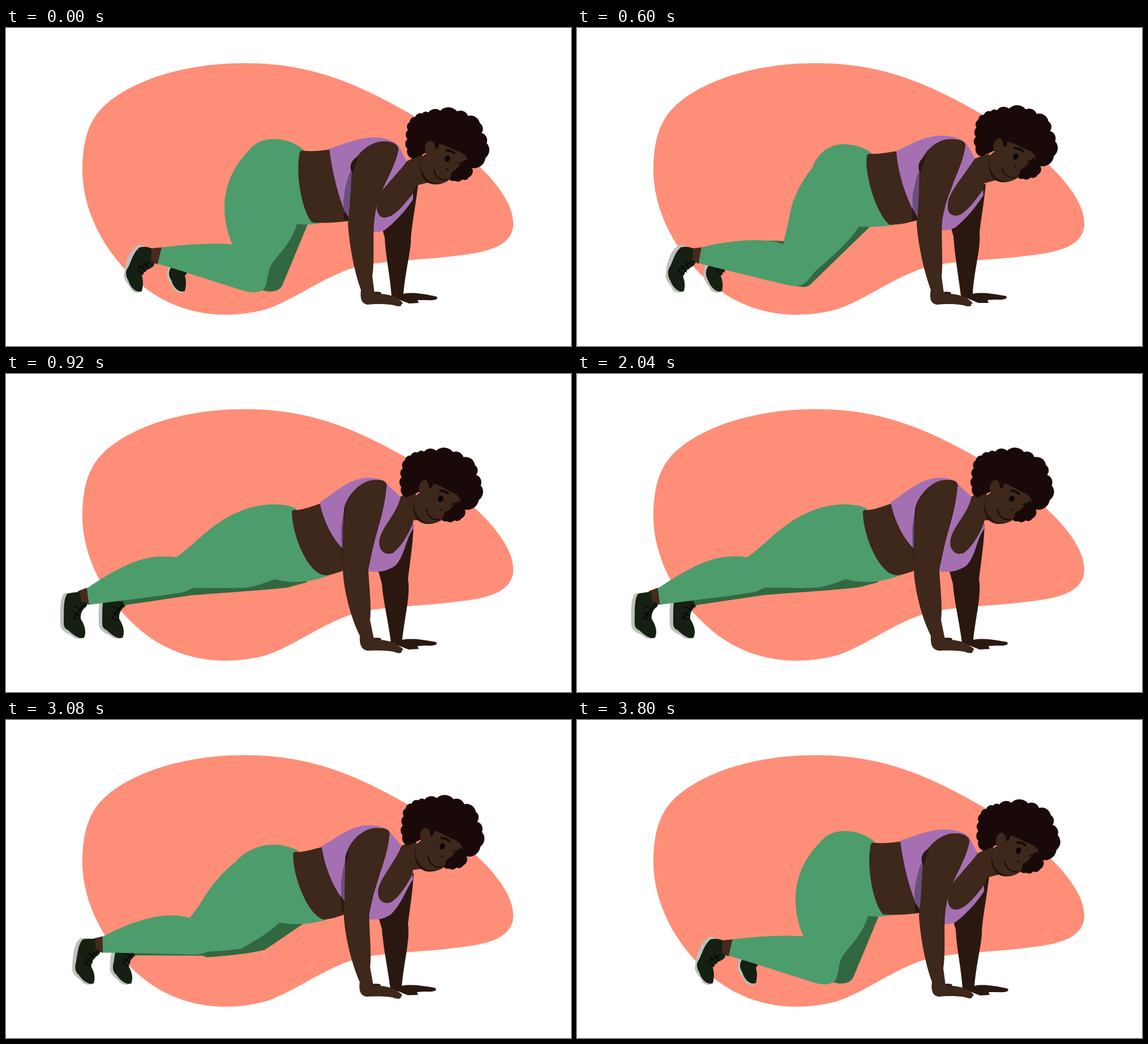
An HTML page for the animation above (3840 ms loop, 998 by 561 pixels).

```html
<!DOCTYPE html>
<html lang="en">
<head>
<meta charset="utf-8">
<title>Knee lift plank</title>
<style>
html, body { margin: 0; height: 100%; overflow: hidden; background: #fff; }
svg { display: block; width: 100vw; height: 100vh; }
</style>
</head>
<body>
<svg id="stage" viewBox="0 0 998 561">
  <path fill="#ff8e78" d="M135,245C136,207 142,182 155,160C186,108 290,62 422,62C545,62 630,103 720,155C770,184 808,215 850,258C880,291 897,320 896,348C894,378 865,393 810,400C745,409 690,409 640,417C575,427 520,475 460,496C390,515 308,509 240,454C165,391 133,310 135,245Z"/>
  <g id="body"></g>
  <g id="head">
    <path id="hair" fill="#190908"/>
    <path fill="#24140e" d="M733,230C729,250 733,275 757,276C772,276 780,270 788,264L750,215Z"/>
    <path fill="#3e271b" d="M742,222C738,214 740,202 748,199C756,198 758,206 759,212C764,214 764,207 765,204C776,205 793,217 803,219C811,223 817,230 814,236C811,244 805,247 800,253C790,259 786,271 768,274C748,276 734,262 732,238Q733,226 742,222Z"/>
    <path fill="#190908" d="M754,200L767,200C764,205 763,212 759,214C757,211 758,205 754,200ZM813,232C802,237 802,247 791,252C783,257 790,262 783,264L793,270L816,252Z"/>
    <ellipse cx="779.7" cy="230.5" rx="4.6" ry="5.7" fill="#0c0605" transform="rotate(25 779.7 230.5)"/>
    <g fill="none" stroke="#140907" stroke-linecap="round">
      <path stroke-width="4" d="M778,216Q787,216 792,221"/>
      <path stroke-width="1.8" d="M756,250C756,260 767,270 779,267"/>
      <path stroke-width="1.5" d="M778,249Q781,247 781,251M799,240L805,237"/>
    </g>
  </g>
</svg>
<script>
const SKIN = '#3e271b', DARK_SKIN = '#2a1810', GREEN = '#4c9c6c', DARK_GREEN = '#326841',
      PURPLE = '#a570b2', DARK_PURPLE = '#6c4f7c';
const $ = id => document.getElementById(id);

// Each shape: colour, then its outline kneeling, halfway and in full plank.
const shoe = [
  ['#bcc0bb',
    'M232,384C238,381 244,383 246,388L240,440L240,464C235,469 225,468 221,461C218,452 205,445 209,432C211,415 217,393 232,384Z',
    'M179,384C186,381 194,384 196,388L188,440L188,464C184,469 173,467 169,462C167,453 153,445 157,432C159,415 164,393 179,384Z',
    'M102,388C107,385 115,386 118,390L130,440L136,462C135,469 122,468 118,463C112,458 97,455 96,443C95,425 95,395 102,388Z'],
  ['#472a1f',
    'M254,389L275,387L268,417L254,412Z',
    'M201,389L220,387L215,416L201,410Z',
    'M127,383L143,377L147,407L130,403Z'],
  ['#152013',
    'M236,387C245,385 252,386 257,389L256,411C265,413 263,420 255,424C245,428 243,432 240,437C243,448 242,455 240,464C232,468 220,460 216,445C208,432 214,425 217,420C222,408 226,395 236,387Z',
    'M183,387C192,385 199,386 205,389L204,409C212,411 210,417 203,421C194,426 190,432 187,438C191,448 191,455 189,464C182,468 170,460 165,446C158,435 161,425 165,420C170,408 174,395 183,387Z',
    'M108,388C115,385 122,386 130,384L133,402C142,402 146,405 141,411C134,415 131,425 132,432C140,445 142,455 138,465C130,469 118,460 110,452C100,448 102,440 102,430C102,415 102,395 108,388Z'],
  ['laces',
    'M231,427L243,434M235,418L247,430M242,410L251,425M233,425Q245,418 254,414',
    'M178,428L190,435M183,419L194,431M190,411L198,425M180,427Q192,418 203,412',
    'M117,430L129,434M119,420L131,427M120,410L134,416M119,431Q129,416 139,406']
];

const backLeg = [
  [DARK_GREEN,
    'M440,400L420,400L318,420L318,428L445,455Z',
    'M366,376L340,375L262,415L265,425L395,450Z',
    'M330,370L300,375L206,398L208,408L330,390Z'],
  [DARK_GREEN,
    'M515,340L533,346L488,454C484,462 476,465 463,465L450,462L470,400Z',
    'M505,345L519,349L420,445C413,452 409,457 400,457L385,455L450,390Z',
    'M500,350L533,367L500,376C460,381 420,383 330,390L320,380L400,350Z']
];

const farArm = [
  [DARK_SKIN,
    'M728,276C724,310 717,345 715,372C716,390 706,425 702,469C715,466 735,468 761,474C764,479 758,481 742,480L727,480L729,485L712,486L681,474C679,440 670,400 669,370L664,352L700,290Z',
    'M722,274C719,310 713,340 711,362C714,385 701,430 699,469C712,466 732,468 758,473C761,478 755,480 739,479L725,480L727,485L709,485L678,472C674,440 667,400 665,368L660,350L700,290Z',
    'M720,265C719,300 713,335 710,362C715,388 704,430 700,469C714,466 734,468 760,473C763,478 757,480 741,479L727,480L729,485L711,486L680,474C676,440 666,400 664,370L657,345L690,300Z']
];

const front = [
  [GREEN,
    'M527,216C508,200 490,196 472,196C450,196 438,205 428,217C400,246 386,280 386,315C386,340 391,362 400,382C360,378 310,383 275,387L268,416C310,428 370,448 415,462C432,468 446,468 455,461C464,450 460,430 470,415C490,390 505,375 514,346C525,347 540,347 553,345L540,300Z',
    'M520,220C503,209 487,205 470,205C446,205 424,222 416,246C392,276 378,308 375,335C372,350 367,368 364,382C340,370 280,372 220,387L215,415C255,425 320,441 370,453C382,456 392,456 399,452C408,447 412,440 418,432C445,407 475,385 498,350C520,352 540,350 558,348L540,300Z',
    'M512,237C500,232 487,230 472,230C445,230 420,238 400,248C365,265 340,292 325,304C318,310 308,318 301,323C262,320 232,318 143,378L147,407C200,400 270,392 312,385C320,383 326,379 332,377C360,377 400,378 425,377C440,375 460,367 475,362C500,369 530,370 572,355L540,300Z'],
  [SKIN,
    'M519,219C521,215 524,217 533,217C550,218 565,215 590,212L610,340C585,343 560,345 541,343C525,328 510,262 519,219Z',
    'M512,225C514,221 517,222 526,222C540,222 555,218 583,215L605,338C580,345 570,347 552,347C530,330 507,260 512,225Z',
    'M505,243C506,239 509,240 515,240C530,238 545,232 580,220L612,342C588,349 578,354 567,355C535,358 505,285 505,243Z'],
  [PURPLE,
    'M571,213C600,203 625,193 650,193C668,193 685,199 692,206C698,215 702,225 708,236L719,291L719,302C708,320 685,345 668,357C660,360 655,360 648,360L607,342C590,310 577,260 571,213Z',
    'M564,217C590,205 615,190 642,190C662,189 678,195 686,202C692,210 698,220 703,231L717,284L718,295C708,310 690,335 668,352C660,356 655,357 645,357L604,340C585,310 567,262 564,217Z',
    'M554,226C575,215 605,182 642,183C652,183 662,186 667,188C675,197 688,208 697,217L719,264L720,272C705,292 705,320 688,338C670,350 655,350 639,348L597,310C580,295 562,265 554,226Z'],
  [DARK_PURPLE,
    'M608,252C598,280 594,305 597,325L606,342L612,260Z',
    'M603,253C592,290 592,300 593,315L603,338L608,260Z',
    'M597,245C590,270 592,290 593,305L597,310L600,260Z'],
  [DARK_SKIN,
    'M597,322L610,341L597,338Z',
    'M592,316L604,339L592,340Z',
    'M592,304L602,320L596,340Z'],
  [SKIN,
    'M708,235C699,248 683,264 671,279C660,290 655,305 655,320C658,336 668,337 681,331C696,322 708,305 719,292L724,278L748,272L735,222Z',
    'M703,230C690,250 670,275 662,290C656,300 654,310 655,320C658,331 667,333 678,329C695,318 706,300 717,286L719,274L742,268L728,222Z',
    'M697,216C693,235 682,250 671,267C660,284 656,298 662,309C667,317 674,319 683,316C697,306 710,285 718,265L720,258L735,258L722,205Z'],
  [DARK_SKIN,
    'M645,466Q663,464 663,468Q661,472 645,471Z',
    'M643,466Q661,464 661,468Q659,472 643,471Z',
    'M645,466Q663,464 663,468Q661,472 645,471Z'],
  [SKIN,
    'M611,250C612,228 640,200 666,200C684,199 695,207 693,216C688,242 672,268 663,290C655,310 652,325 650,345C648,370 651,415 647,438L651,468C670,469 688,472 694,479C702,484 702,487 698,487C700,492 693,492 685,489C668,486 650,487 638,488C628,486 625,478 627,462C615,430 606,380 604,345C608,315 609,280 611,250Z',
    'M605,247C607,225 630,196 660,196C678,196 687,200 686,208C683,235 668,262 661,284C652,306 650,315 645,340C643,370 647,415 644,438L648,468C667,469 686,472 692,479C699,484 700,487 696,487C698,492 690,492 682,489C665,486 648,487 635,488C625,486 622,478 625,462C613,430 602,380 600,345C604,315 604,280 605,247Z',
    'M597,240C598,220 625,187 650,187C666,186 675,190 672,200C669,235 660,262 654,284C648,306 646,318 640,345C641,370 646,410 643,434L650,468C668,469 688,472 694,480C702,484 703,487 699,488C700,494 692,493 685,490C668,487 651,488 638,488C628,486 624,478 625,462C609,430 596,380 595,345C596,315 593,290 597,240Z'],
  [DARK_SKIN,
    'M622,226C607,234 606,248 612,258Z',
    'M617,225C602,233 601,246 606,256Z',
    'M600,232C597,238 596,246 597,255Z']
];

const moving = [];
const svgNode = (tag, parent) =>
  parent.appendChild(document.createElementNS('http://www.w3.org/2000/svg', tag));

function addPart(shapes) {
  const group = svgNode('g', $('body'));
  for (const [colour, ...poses] of shapes) {
    const node = svgNode('path', group);
    node.setAttribute('fill', colour === 'laces' ? 'none' : colour);
    if (colour === 'laces') {
      node.setAttribute('stroke', '#050805');
      node.setAttribute('stroke-width', 1.8);
    }
    moving.push({ node, path: poses[0], values: poses.map(p => p.match(/\d+/g).map(Number)) });
  }
  return group;
}

const backShoe = addPart(shoe);
addPart(backLeg);
addPart(farArm);
addPart(shoe);
addPart(front);

// Curls are round arcs between neighbouring points.
const curls = [[719,231],[709,213],[709,196],[710,180],[713,166],[723,157],[735,151],[746,149],
  [767,146],[797,147],[816,155],[837,168],[840,185],[849,203],[847,229],[823,247],[818,263],
  [806,267],[793,269],[782,265]];
$('hair').setAttribute('d', 'M' + curls.map((p, i) => {
  if (!i) return p;
  const q = curls[i - 1], r = 0.68 * Math.hypot(p[0] - q[0], p[1] - q[1]);
  return `A${r},${r} 0 0 1 ${p}`;
}).join('') + 'L742,220Z');

const LOOP = 3840, STEP = 40, START = 270, END = 930;

// Quadratic through three poses at u = 0, 0.5 and 1.
const blend = (a, b, c, u) => a * (1 - u) * (1 - 2 * u) + 4 * b * u * (1 - u) + c * u * (2 * u - 1);

function draw(now) {
  const t = Math.floor(now % LOOP / STEP) * STEP;
  const x = Math.max(0, Math.min(1, (Math.min(t, LOOP - t) - START) / (END - START)));
  const u = x * x * (3 - 2 * x);
  for (const { node, path, values: [a, b, c] } of moving) {
    let i = 0;
    node.setAttribute('d', path.replace(/\d+/g, () => blend(a[i], b[i], c[i++], u).toFixed(2)));
  }
  backShoe.setAttribute('transform', `translate(${blend(76, 67, 68, u)} 0)`);
  $('head').setAttribute('transform',
    `translate(${blend(0, -4.5, -11, u)} ${blend(0, -3.7, -10.5, u)}) rotate(${blend(0, 0.3, 3, u)} 775 215)`);
  requestAnimationFrame(draw);
}
requestAnimationFrame(draw);
</script>
</body>
</html>
```
